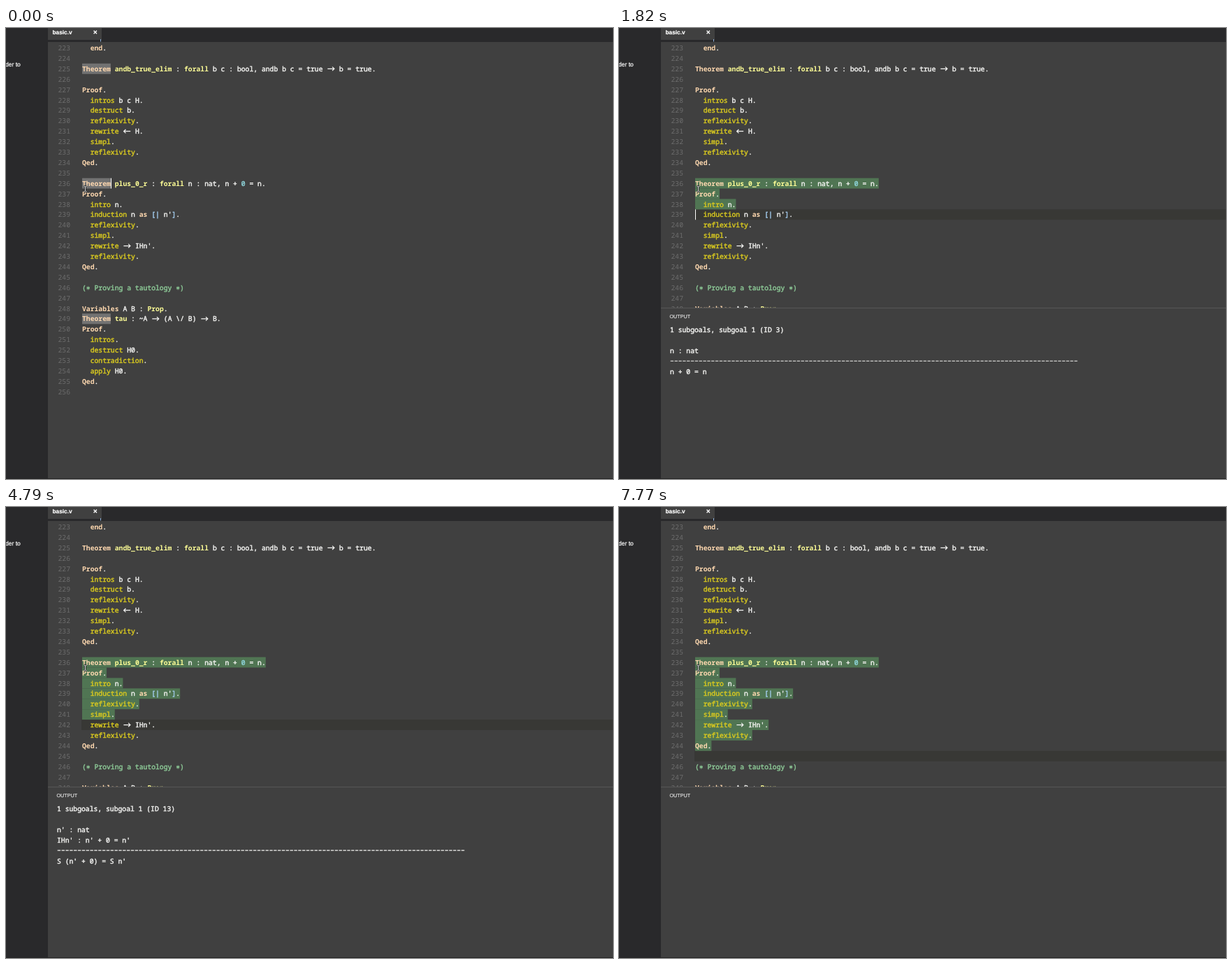
Recreate the animation shown at these times as an HTML page with a canvas. Size 869 px wide and 645 px high, loop 8000 ms.

```html
<!DOCTYPE html>
<html lang="en">
<head>
<meta charset="utf-8">
<title>Proof stepping</title>
<style>
  html, body { margin: 0; width: 100%; height: 100%; overflow: hidden; background: #404040; }
  canvas { display: block; }
</style>
</head>
<body>
<canvas id="stage" width="869" height="645"></canvas>
<script>
const ctx = document.getElementById('stage').getContext('2d');
ctx.textRendering = 'geometricPrecision';
ctx.lineJoin = 'round';

const LOOP = 8000;
const W = 869, H = 645;
const COL = 5.84, ROW = 14.9;
const CODE_X = 109, CODE_Y = 21, OUT_X = 73, OUT_Y = 424.1;
const FIRST = 223, PANEL_Y = 400;
const MONO = '9.73px "Noto Sans Mono", "DejaVu Sans Mono", monospace';
const SANS = '"Liberation Sans", Arial, sans-serif';

const COLORS = {
  comment: '#8cc896', keyword: '#ffd9b0', name: '#fdfd96', tactic: '#d9c91f',
  number: '#8fd6dc', bracket: '#a4cdf0', plain: '#f2f2f0'
};

const CODE = `  end.

Theorem andb_true_elim : forall b c : bool, andb b c = true -> b = true.

Proof.
  intros b c H.
  destruct b.
  reflexivity.
  rewrite <- H.
  simpl.
  reflexivity.
Qed.

Theorem plus_0_r : forall n : nat, n + 0 = n.
Proof.
  intro n.
  induction n as [| n'].
  reflexivity.
  simpl.
  rewrite -> IHn'.
  reflexivity.
Qed.

(* Proving a tautology *)

Variables A B : Prop.
Theorem tau : ~A -> (A \\/ B) -> B.
Proof.
  intros.
  destruct H0.
  contradiction.
  apply H0.
Qed.
`.split('\n');

const TOKEN = new RegExp([
  '(?<comment>\\(\\*.*\\*\\))',
  '(?<keyword>\\b(?:Theorem|Proof|Qed|Variables|end|as)\\b)',
  '(?<name>\\b(?:forall|Prop|andb_true_elim|plus_0_r|tau)\\b)',
  '(?<tactic>\\b(?:intros?|destruct|reflexivity|rewrite|simpl|induction|contradiction|apply)\\b)',
  '(?<number>\\b0\\b)',
  '(?<bracket>\\[\\|?|\\])',
  '(?<arrow>->|<-)',
  "(?<plain>[\\w']+|[^\\s\\w])"
].join('|'), 'g');

const TOKENS = CODE.map(line => [...line.matchAll(TOKEN)].map(m => {
  const kind = Object.keys(m.groups).find(k => m.groups[k] !== undefined);
  return { text: m[0].replace(/\*/g, '\u2217'), col: m.index, kind };
}));

const RULE = '-'.repeat(100);
const goal = (id, facts, result) =>
  [`1 subgoals, subgoal 1 (ID ${id})`, '', ...facts, RULE, result];
const STEP_FACTS = ["n' : nat", "IHn' : n' + 0 = n'"];

const GOALS = {
  start: goal(2, [], 'forall n : nat, n + 0 = n'),
  intro: goal(3, ['n : nat'], 'n + 0 = n'),
  cases: ['2 subgoals, subgoal 1 (ID 7)', '', RULE, '0 + 0 = 0', '',
          'subgoal 2 (ID 10) is:', " S n' + 0 = S n'"],
  succ: goal(10, STEP_FACTS, "S n' + 0 = S n'"),
  simpl: goal(13, STEP_FACTS, "S (n' + 0) = S n'"),
  rewrite: goal(14, STEP_FACTS, "S n' = S n'"),
  done: ['No more subgoals.'],
  none: []
};

// Each event: time, then the parts of the state that change.
const EVENTS = [
  [450, { line: 237, caret: true, out: 'start' }],
  [780, { line: 238, caret: true, out: 'none' }],
  [1080, { out: 'start' }],
  [1380, { caret: false }],
  [1680, { line: 239, caret: true, out: 'none' }],
  [1820, { out: 'intro' }],
  [2120, { caret: false }],
  [2560, { caret: true }],
  [2710, { line: 240, out: 'none' }],
  [3010, { out: 'cases' }],
  [3310, { caret: false }],
  [3610, { line: 241, caret: true, out: 'none' }],
  [3910, { out: 'succ' }],
  [4050, { caret: false }],
  [4200, { line: 242, caret: true, out: 'none' }],
  [4490, { out: 'simpl' }],
  [4790, { caret: false }],
  [5090, { line: 243, caret: true, out: 'none' }],
  [5240, { out: 'rewrite' }],
  [5530, { caret: false }],
  [5980, { caret: true }],
  [6130, { line: 244, out: 'none' }],
  [6280, { out: 'done' }],
  [6580, { caret: false }],
  [7020, { caret: true }],
  [7170, { line: 245, out: 'none' }],
  [7770, { caret: false }]
];

function stateAt(t) {
  const state = { line: 0, caret: true, out: 'none' };
  for (const [time, change] of EVENTS) if (time <= t) Object.assign(state, change);
  return state;
}

const rowTop = line => CODE_Y + (line - FIRST) * ROW;

function rect(x, y, w, h, color) {
  ctx.fillStyle = color;
  ctx.fillRect(x, y, w, h);
}

// A thin outline thickens the glyphs by the given amount.
function text(str, x, y, color, font, thicken = 0) {
  ctx.font = font;
  ctx.fillStyle = ctx.strokeStyle = color;
  ctx.fillText(str, x, y);
  if (!thicken) return;
  ctx.lineWidth = thicken;
  ctx.strokeText(str, x, y);
}

function arrow(x, y, dir) {
  const tip = x + (dir > 0 ? 10.6 : 1.2), tail = x + (dir > 0 ? 1 : 10.8);
  ctx.strokeStyle = COLORS.plain;
  ctx.lineWidth = 1.2;
  ctx.beginPath();
  ctx.moveTo(tail, y);
  ctx.lineTo(tip, y);
  ctx.moveTo(tip - dir * 2.9, y - 2.7);
  ctx.lineTo(tip, y);
  ctx.lineTo(tip - dir * 2.9, y + 2.7);
  ctx.stroke();
}

function drawToken({ text: str, col, kind }, y) {
  const x = CODE_X + col * COL;
  if (kind === 'arrow') return arrow(x, y + 7.5, str === '->' ? 1 : -1);
  const bold = kind === 'keyword' || kind === 'name';
  text(str, x, y + 11, COLORS[kind], `${bold ? 700 : 500} ${MONO}`, bold ? 0 : 0.45);
}

function drawMarks({ line, caret }) {
  if (!line) {
    for (const n of [225, 236, 249]) rect(CODE_X, rowTop(n), 7 * COL, ROW, '#727272');
    rect(150, rowTop(236), 1, ROW, '#ffffff');
    return;
  }
  rect(CODE_X - 1, rowTop(line), W, ROW, '#383835');
  for (let n = 236; n < line; n++) {
    rect(CODE_X, rowTop(n), CODE[n - FIRST].length * COL, ROW, '#507553');
  }
  if (caret) rect(109, rowTop(line), 1, ROW, '#ffffff');
}

function drawPointer() {
  for (const [color, width] of [['#2c2c2c', 2.4], ['#e4e4e4', 0.9]]) {
    ctx.strokeStyle = color;
    ctx.lineWidth = width;
    ctx.beginPath();
    ctx.moveTo(111.5, 226);
    ctx.quadraticCurveTo(113.5, 226, 113.5, 228);
    ctx.lineTo(113.5, 232.5);
    ctx.quadraticCurveTo(113.5, 234, 111.5, 234);
    ctx.moveTo(115.5, 226);
    ctx.quadraticCurveTo(113.5, 226, 113.5, 228);
    ctx.moveTo(113.5, 232.5);
    ctx.quadraticCurveTo(113.5, 234, 115.5, 234);
    ctx.stroke();
  }
}

function drawEditor(state) {
  ctx.save();
  ctx.beginPath();
  ctx.rect(60, 19, W - 60, (state.line ? PANEL_Y : H) - 19);
  ctx.clip();
  drawMarks(state);
  TOKENS.forEach((tokens, i) => {
    const y = CODE_Y + i * ROW;
    text(FIRST + i, 74.5, y + 11, '#6c6c6c', `400 ${MONO}`);
    tokens.forEach(token => drawToken(token, y));
  });
  ctx.restore();
  drawPointer();
}

function drawRule(y) {
  ctx.strokeStyle = COLORS.plain;
  ctx.lineWidth = 1.1;
  ctx.setLineDash([4.4, COL - 4.4]);
  ctx.beginPath();
  ctx.moveTo(OUT_X + 0.7, y);
  ctx.lineTo(OUT_X + RULE.length * COL - 0.7, y);
  ctx.stroke();
  ctx.setLineDash([]);
}

function drawPanel(out) {
  rect(60, PANEL_Y, W - 60, 1, '#565656');
  text('OUTPUT', 72.5, 415.2, '#dcdcdc', `7.2px ${SANS}`, 0.2);
  GOALS[out].forEach((line, i) => {
    const y = OUT_Y + i * ROW;
    if (line === RULE) drawRule(y + 7.4);
    else text(line, OUT_X, y + 11, COLORS.plain, `500 ${MONO}`, 0.45);
  });
}

function drawFrame() {
  rect(0, 0, W, H, '#404040');
  rect(0, 0, 60, H, '#29292b');
  rect(60, 0, W - 60, 20, '#29292b');
  rect(60, 0, 77, 17, '#404040');
  rect(135, 16, 1, 3.5, '#8fb2dc');
  rect(0, H - 1, W, 1, '#232324');
  text('basic.v', 66.5, 9.3, '#ffffff', `bold 8.3px ${SANS}`, 0.2);
  text('der to', -1, 55.2, '#e6e6e6', `8.5px ${SANS}`, 0.35);
  ctx.strokeStyle = '#ffffff';
  ctx.lineWidth = 1.3;
  ctx.beginPath();
  ctx.moveTo(125.6, 3.8);
  ctx.lineTo(130, 8.2);
  ctx.moveTo(130, 3.8);
  ctx.lineTo(125.6, 8.2);
  ctx.stroke();
}

const begin = performance.now();

function tick() {
  const state = stateAt((performance.now() - begin) % LOOP);
  drawFrame();
  drawEditor(state);
  if (state.line) drawPanel(state.out);
  requestAnimationFrame(tick);
}
tick();
</script>
</body>
</html>
```
